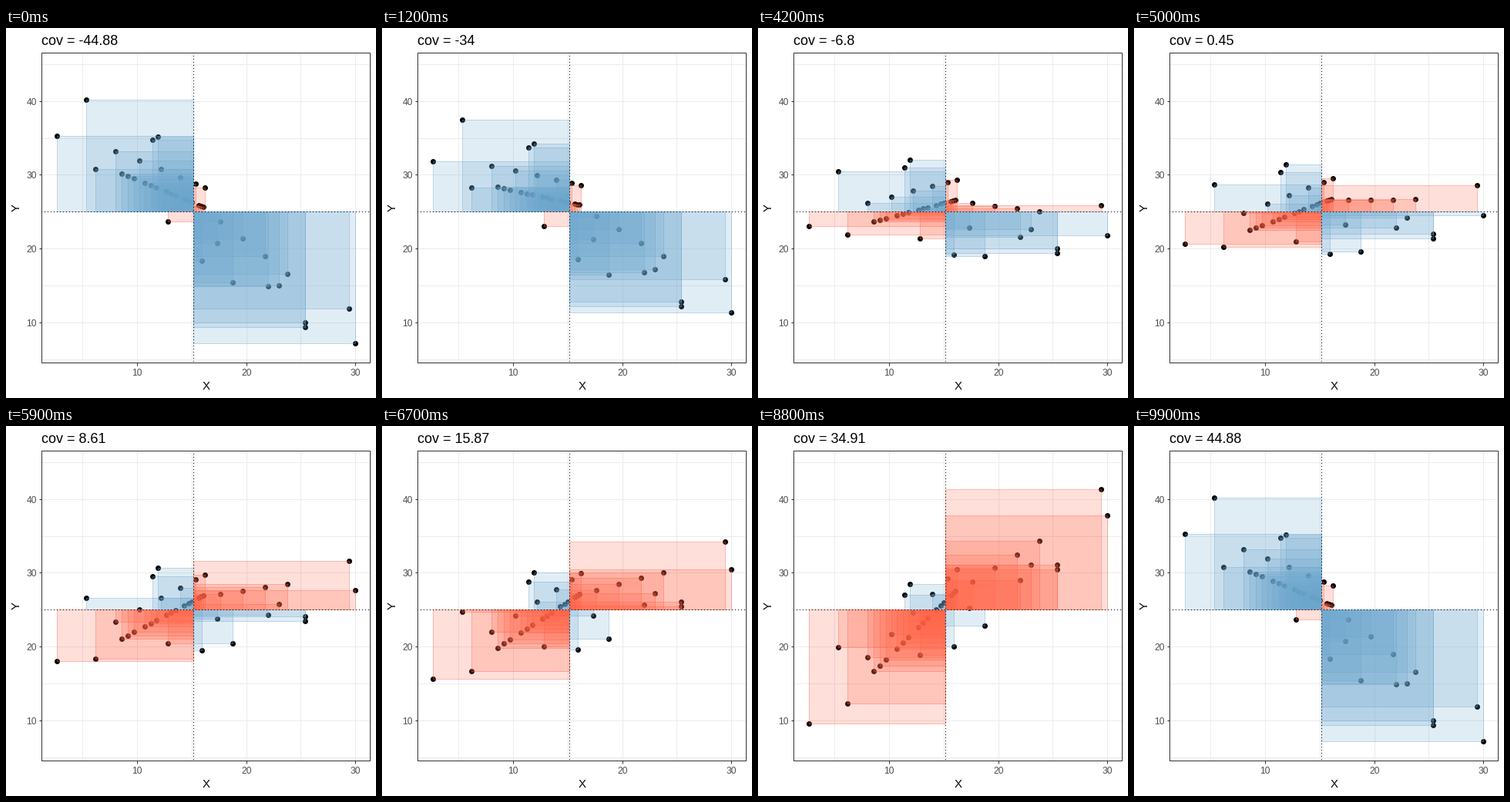
Write a matplotlib script that moves like this. It is 480 by 480 pixels and loops after 10 s.

```python
import numpy as np
import matplotlib.pyplot as plt
from matplotlib.animation import FuncAnimation
from matplotlib.collections import PolyCollection
from matplotlib.colors import to_rgba
from matplotlib.patches import Rectangle

SIZE, DPI = 480, 100
PX = 72 / DPI                       # one pixel in points
FRAMES, STEP = 100, 100
COV = 44.88
CX, CY = 243, 238                   # means of X and Y, in pixels
LEFT, TOP, RIGHT, BOTTOM = 46, 32, 472, 434
RED, BLUE = "#FF6347", "#6CA6CD"
TILT, TURN = 0.7875, 0.01585        # starting slope, change per frame


def scatter():
    """Points in pixels, as they lie when the slope is zero."""
    # Dense cloud, packed towards the centre
    i = np.arange(21)
    x = 142 + 116 * (1 - (1 - i / 20) ** 1.4)
    y = 262 - 0.38 * (x - 150) - 26 * (i % 4 == 0)
    # Even row on the right
    row_x = np.linspace(278, 365, 4)
    row_y = np.full(4, 223)
    # Outer points that set the extent
    key_x, key_y = zip(
        (66, 279), (104, 202.5), (116, 283), (190, 187), (197, 177),
        (210, 277), (254, 293), (274, 255), (294, 290), (340, 259),
        (354, 247), (388, 268), (388, 274), (445, 205), (453, 243.6))
    return (np.round(np.concatenate([x, row_x, key_x])),
            np.concatenate([y, row_y, key_y]))


X, MID = scatter()


def px_x(v):
    return round(170 + (v - 10) * 14.15)


def px_y(v):
    return round(238.3 - (v - 25) * 9.567)


plt.rcParams["font.family"] = "Liberation Sans"
fig = plt.figure(figsize=(SIZE / DPI, SIZE / DPI), dpi=DPI, facecolor="white")
ax = fig.add_axes([0, 0, 1, 1])
# The small offset keeps whole numbers snapping to their own pixel
ax.set_xlim(-0.2, SIZE - 0.2)
ax.set_ylim(SIZE - 0.2, -0.2)
ax.axis("off")


def line(xs, ys, color, z, **kw):
    ax.plot(xs, ys, color=color, lw=PX, zorder=z, solid_capstyle="butt",
            dash_capstyle="butt", **kw)


def label(x, y, s, size, color="black", **kw):
    return ax.text(x, y, s, fontsize=size * PX, color=color, **kw)


# Grid, ticks and tick labels
for v in range(5, 50, 5):
    y = px_y(v)
    line([LEFT, RIGHT], [y, y], "#EBEBEB", 1)
    if v % 10 == 0:
        line([LEFT - 3, LEFT], [y, y], "#333333", 6)
        label(39.5, y + 1.5, str(v), 12, "#4D4D4D", ha="right", va="center")
for v in range(5, 35, 5):
    x = px_x(v)
    line([x, x], [TOP, BOTTOM], "#EBEBEB", 1)
    if v % 10 == 0:
        line([x, x], [BOTTOM, BOTTOM + 4], "#333333", 6)
        label(x, 448, str(v), 12, "#4D4D4D", ha="center", va="center")

ax.add_patch(Rectangle((LEFT, TOP), RIGHT - LEFT, BOTTOM - TOP, fill=False,
                       ec="#333333", lw=PX, zorder=6))
dotted = dict(ls=(0.5, (1, 3)), antialiased=False)
line([CX, CX], [TOP, BOTTOM], "black", 5, **dotted)
line([LEFT, RIGHT], [CY, CY], "black", 5, **dotted)

label(259, 464.5, "X", 15, ha="center", va="center")
label(14, 233, "Y", 15, ha="center", va="center", rotation=90)
title = label(46, 22, "", 18, va="baseline")

dots, = ax.plot([], [], "o", color="black", ms=7 * PX, mew=0, zorder=2)
boxes = PolyCollection([], linewidths=PX, zorder=3)
boxes.set_snap(True)
ax.add_collection(boxes, autolim=False)


def update(n):
    # The title counts to the end, while the last pose is the first again
    slope = TILT - TURN * (n % (FRAMES - 1))
    y = np.round(MID + slope * (X - CX))
    dots.set_data(X, y)
    boxes.set_verts([[(CX, CY), (a, CY), (a, b), (CX, b)]
                     for a, b in zip(X, y)])
    colors = np.where((X - CX) * (CY - y) > 0, RED, BLUE)
    boxes.set_facecolor([to_rgba(str(c), 0.2) for c in colors])
    boxes.set_edgecolor([to_rgba(str(c), 0.4) for c in colors])
    cov = round(-COV + 2 * COV * n / (FRAMES - 1), 2)
    title.set_text(f"cov = {cov:g}")
    return dots, boxes, title


anim = FuncAnimation(fig, update, frames=FRAMES, interval=STEP,
                     repeat=True, repeat_delay=0, blit=False)
plt.show()
```
